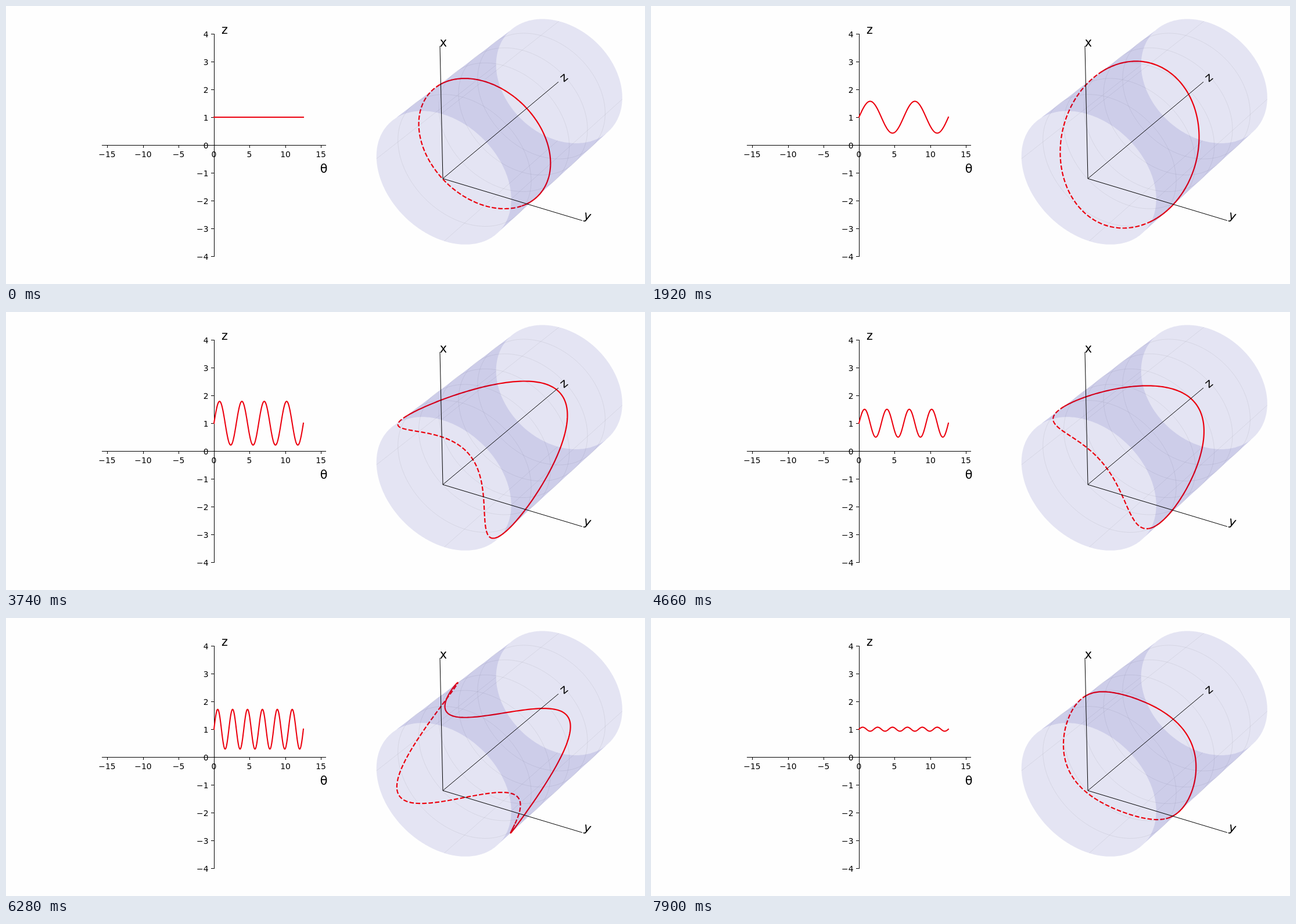
Write an HTML page that moves like this. It is 1100 by 480 pixels and loops after 8 s.

```html
<!DOCTYPE html>
<html lang="en">
<head>
<meta charset="utf-8">
<title>Sine wave wrapped on a cylinder</title>
<style>
  html, body { margin: 0; width: 100%; height: 100%; overflow: hidden; background: #fefefe; }
  svg { display: block; width: 1100px; height: 480px; }
  text { font-family: "DejaVu Sans", sans-serif; font-size: 13.9px; text-anchor: middle; }
  .name { font-size: 20.8px; }
  .axis { stroke: #000; stroke-width: 1; fill: none; }
  .wall { fill: rgb(0, 0, 145); fill-opacity: .1; }
  .seam { fill: none; stroke: #78787f; stroke-opacity: .13; stroke-width: 1; }
  .curve { fill: none; stroke: #ec000e; stroke-width: 2.2; stroke-linejoin: round; }
  #wave { stroke-width: 2.08; stroke-linecap: square; }
  #back { stroke-dasharray: 7.7 3.3; }
</style>
</head>
<body>
<svg viewBox="0 0 1100 480">
  <g id="plot"></g>
  <path id="wave" class="curve"/>
  <path id="shell" class="wall"/>
  <path id="seams" class="seam"/>
  <path id="back" class="curve"/>
  <path id="front" class="curve"/>
  <path id="band" class="wall"/>
  <path id="axes" class="axis"/>
  <text class="name" x="753" y="70">x</text>
  <text class="name" transform="translate(1001 363) rotate(17)" y="6">y</text>
  <text class="name" transform="translate(960.5 124) rotate(-40)" y="6">z</text>
</svg>
<script>
const $ = id => document.getElementById(id);
const RAD = Math.PI / 180;
const RADIUS = 0.996, LENGTH = 3;

// Perspective projection of the 3D scene onto the stage.
function project(x, y, z) {
  const w = 1 - 0.018 * x - 0.015 * y + 0.0317 * z;
  return [
    (752 - 16 * x + 105.1 * y + 96.4 * z) / w,
    (298 - 115.7 * x + 30.45 * y - 51.5 * z) / w
  ];
}

const onWall = (angle, z) => project(RADIUS * Math.sin(angle), RADIUS * Math.cos(angle), z);

function sample(from, to, count, point) {
  return Array.from({ length: count + 1 }, (_, i) => point(from + (to - from) * i / count));
}

const path = points => 'M' + points.map(p => p.map(v => v.toFixed(2)).join(' ')).join('L');

function arc(from, to, z) {
  const height = typeof z === 'function' ? z : () => z;
  return sample(from * RAD, to * RAD, 160, a => onWall(a, height(a)));
}

function drawPlot() {
  const text = (x, y, s, extra = '') => `<text x="${x}" y="${y}" ${extra}>${s}</text>`;
  const label = v => String(v).replace('-', '\u2212');
  let lines = 'M165 240.5H551M358.5 48V433', texts = '';
  for (let v = -15; v <= 15; v += 5) {
    const x = Math.round(358 + 12.25 * v);
    lines += `M${x + .5} 240v5`;
    texts += text(x, 261, label(v));
  }
  for (let v = -4; v <= 4; v++) {
    const y = 240 - 48 * v;
    lines += `M353 ${y + .5}h5`;
    texts += text(348.5, y + 5.5, label(v), 'style="text-anchor:end"');
  }
  texts += text(376.5, 48, 'z', 'class="name"') + text(547, 288, 'θ', 'class="name"');
  $('plot').innerHTML = `<path class="axis" d="${lines}"/>${texts}`;
}

function drawCylinder() {
  $('shell').setAttribute('d', path([...arc(140, 320, 0), ...arc(-40, 140, LENGTH)]) + 'Z');
  $('band').setAttribute('d', path([...arc(-40, 140, 0), ...arc(140, 320, LENGTH)]) + 'Z');
  let seams = '';
  for (let z = 0.5; z < LENGTH; z += 0.5) seams += path(arc(0, 360, z));
  for (let a = 0; a < 360; a += 90) seams += path([onWall(a * RAD, 0), onWall(a * RAD, LENGTH)]);
  $('seams').setAttribute('d', seams);
  $('axes').setAttribute('d', 'M747 69L752 298L992 370.5M752 298L951 131');
}

// The amplitude climbs and falls in 14 steps; each run opens with a short step.
function stateAt(t) {
  const run = Math.max(0, Math.floor((t - 80) / 1320));
  const r = t - 80 - 1320 * run;
  const step = r < 20 ? 0 : 1 + Math.floor((r - 20) / 100);
  return { n: 1 + (run >> 1), amp: (run % 2 ? 14 - step : step) / 14 };
}

let shown = '';
function frame(now) {
  const { n, amp } = stateAt(now % 8000);
  const key = n + ':' + amp;
  if (key !== shown) {
    shown = key;
    const z = a => 1 + amp * Math.sin(n * a);
    $('wave').setAttribute('d', path(sample(0, 4 * Math.PI, 400, a => [358 + 12.25 * a, 240 - 48 * z(a)])));
    $('front').setAttribute('d', path(arc(-55, 131, z)));
    $('back').setAttribute('d', path(arc(131, 305, z)));
  }
  requestAnimationFrame(frame);
}

drawPlot();
drawCylinder();
frame(0);
</script>
</body>
</html>
```
